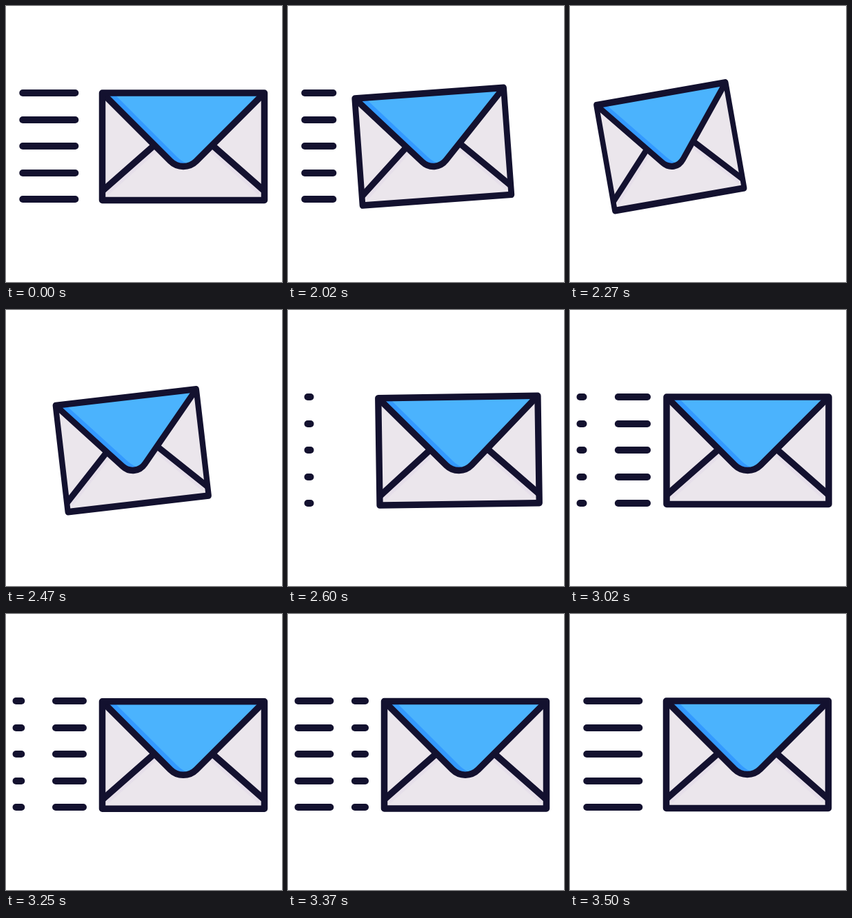
Write an HTML page with a canvas that moves like this. It is 400 by 400 pixels and loops after 3520 ms.

```html
<!DOCTYPE html>
<html>
<head>
<meta charset="utf-8">
<title>Sending mail</title>
<style>
  html, body { margin: 0; width: 100%; height: 100%; overflow: hidden; background: #fff; }
  canvas { display: block; width: 100vmin; height: 100vmin; }
</style>
</head>
<body>
<canvas id="stage" width="400" height="400"></canvas>
<script>
const ctx = document.getElementById('stage').getContext('2d');
const LOOP = 3520, HOLD = 2020, STEP = 25;
const INK = '#13112f', PAPER = '#ebe6ec', SHADE = '#e6dfea', BLUE = '#4bb3fd', DEEP = '#3399ff';
const CENTER = { x: 257, y: 203.7 };

const clamp = v => Math.min(1, Math.max(0, v));
const smooth = v => { v = clamp(v); return v * v * (3 - 2 * v); };
const sineOut = v => Math.sin(clamp(v) * Math.PI / 2);
const bump = (n, from, to) => Math.sin(Math.PI * clamp((n - from) / (to - from)));

// How far the envelope is drawn back, 0 at rest and 1 fully back.
function pull(n) {
  return n < 18 ? 1 - Math.pow(0.583, n) : Math.exp(-0.411 * (n - 18));
}

// Visible part of a speed line as [start, end]; values above 1 wrap around.
function trim(n) {
  if (n < 20) {
    const length = 0.78 * Math.pow(0.54, n);
    return [0.1, 0.1 + (length > 0.01 ? length : 0)];
  }
  const out = smooth((n - 50) / 10);
  const start = 0.59 * sineOut((n - 20) / 25.5) + 0.51 * out;
  const length = 0.49 * smooth((n - 20) / 22.5) + 0.29 * out;
  return [start, start + length];
}

function stroke(color, width, ...lines) {
  ctx.strokeStyle = color;
  ctx.lineWidth = width;
  ctx.beginPath();
  for (const [x1, y1, x2, y2] of lines) {
    ctx.moveTo(x1, y1);
    ctx.lineTo(x2, y2);
  }
  ctx.stroke();
}

function drawSpeedLines(n) {
  const [start, end] = trim(n);
  const left = 14.5, span = 97.5;
  ctx.lineCap = 'round';
  for (let row = 0; row < 5; row++) {
    const y = Math.round(126 + row * 38.6);
    for (const lap of [0, 1]) {
      const a = clamp(start - lap), b = clamp(end - lap);
      if (b > a) stroke(INK, 10, [left + a * span, y, left + b * span, y]);
    }
  }
}

function flapPath() {
  ctx.beginPath();
  ctx.moveTo(-117.5, -77.7);
  ctx.arcTo(0, 39.8, 117.5, -77.7, 26.5);
  ctx.lineTo(117.5, -77.7);
}

function drawFlap() {
  flapPath();
  ctx.fillStyle = DEEP;
  ctx.fill();
  ctx.save();
  ctx.clip();
  ctx.fillStyle = BLUE;
  ctx.beginPath();
  ctx.moveTo(-102, -78);
  ctx.lineTo(-9, 15);
  ctx.quadraticCurveTo(-2, 22, 8, 26);
  ctx.lineTo(40, 26);
  ctx.lineTo(130, -78);
  ctx.fill();
  ctx.restore();
  flapPath();
  ctx.strokeStyle = INK;
  ctx.lineWidth = 9.5;
  ctx.stroke();
}

function drawEnvelope(n) {
  const p = pull(n);
  ctx.save();
  ctx.translate(CENTER.x - 112 * p + 0.5 * bump(n, 30, 50), CENTER.y + 0.8 * bump(n, 42, 60));
  ctx.rotate(-10 * p * Math.PI / 180);
  ctx.scale(1 - 0.19 * p, 1);
  ctx.lineJoin = 'round';
  ctx.lineCap = 'butt';

  const box = [-117.5, -77.7, 235, 155.4];
  ctx.fillStyle = PAPER;
  ctx.fillRect(...box);
  stroke(SHADE, 5, [-110, 68, -38, 4], [110, 68, 38, 4]);
  stroke(INK, 9.5, [-117, 64.1, -42, -1.9], [117, 64.1, 42, -1.9]);
  drawFlap();
  ctx.strokeStyle = INK;
  ctx.lineWidth = 9.5;
  ctx.strokeRect(...box);
  ctx.restore();
}

function render(now) {
  const t = now % LOOP;
  const n = t < HOLD ? 0 : Math.min(60, Math.floor((t - HOLD) / STEP) + 1);
  ctx.fillStyle = '#fff';
  ctx.fillRect(0, 0, 400, 400);
  drawSpeedLines(n);
  drawEnvelope(n);
}

const begin = performance.now();
function tick() {
  render(performance.now() - begin);
  requestAnimationFrame(tick);
}
tick();
</script>
</body>
</html>
```
